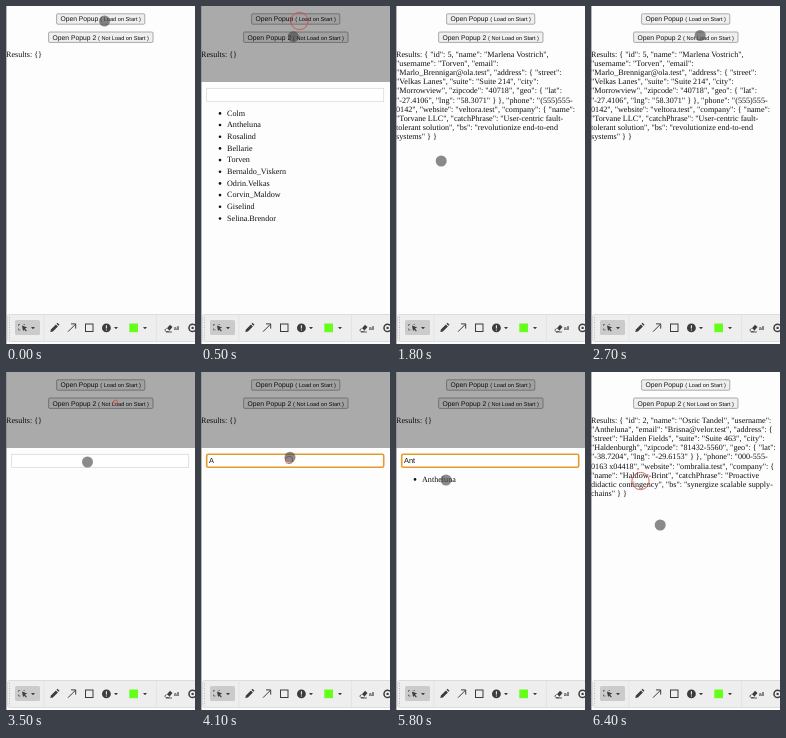
An HTML page for the animation above (6.5 s loop, 189 by 338 pixels).

```html
<!DOCTYPE html>
<html lang="en">
<head>
<meta charset="utf-8">
<title>Popup search</title>
<style>
  html, body { margin: 0; width: 100%; height: 100%; overflow: hidden; background: #fdfdfd; }
  svg { display: block; width: 189px; height: 338px; }
  text { font: 8.15px "Liberation Serif", "Times New Roman", serif; fill: #111; text-rendering: geometricPrecision; }
  .ui { font: 6.76px "Liberation Sans", Arial, sans-serif; text-anchor: middle; }
  .ui tspan { font-size: 5.63px; }
  .button { fill: #efefef; stroke: #767676; stroke-width: .6; }
  .icon { fill: none; stroke: #3c3c3c; stroke-width: 1; }
  .solid { fill: #3c3c3c; }
</style>
</head>
<body>
<svg viewBox="0 0 189 338">
  <rect width="189" height="338" fill="#fdfdfd"/>
  <rect class="button" x="50.6" y="7.8" width="88.2" height="10.4" rx="1.2"/>
  <text class="ui" x="94.7" y="15.3">Open Popup <tspan>( Load on Start )</tspan></text>
  <rect class="button" x="42.6" y="26" width="104.4" height="10.4" rx="1.2"/>
  <text class="ui" x="94.8" y="33.5">Open Popup 2 <tspan>( Not Load on Start )</tspan></text>
  <g id="results"></g>

  <g id="popup">
    <rect width="189" height="338" opacity=".33"/>
    <rect y="76" width="189" height="262" fill="#fdfdfd"/>
    <rect id="field" x="5.7" y="82.3" width="177" height="13" fill="#fff"/>
    <text id="query" class="ui" x="8" y="91.4" style="text-anchor:start;font-size:7.4px"></text>
    <g id="list"></g>
  </g>
  <rect width=".6" height="338" fill="#888"/>

  <g id="toolbar">
    <rect x="1.5" y="308.5" width="190" height="27" rx="2" fill="#eee" stroke="#d2d2d2" stroke-width=".7"/>
    <path d="M3.5 311V334" stroke="#bbb" stroke-dasharray="1 1.5"/>
    <rect x="9" y="314" width="25" height="15" rx="1.5" fill="#cbcbcb"/>
    <path d="M38 309V335M150.5 309V335" stroke="#e0e0e0" stroke-width=".7"/>
    <path class="solid" d="M16 319.5l5.2 2-2.2 1 1.8 2.2-.9.9-1.8-2.2-1 1.8z"/>
    <path class="icon" style="stroke-width:.6" d="M14 318.500h-1.500v1.500M17.500 318.500h1.500M12.500 322.500v1.500h2"/>
    <path class="solid" d="M25 321h4l-2 2.200zM108 321h4l-2 2.200zM137 321h4l-2 2.200z"/>
    <path class="solid" d="M44.300 325.900l.6-2.500 5-5 2 2-5 5zM50.500 317.700l1-1 2 2-1 1z"/>
    <path class="icon" d="M62 325.700l7.500-7.500M65 317.900h4.700v4.700"/>
    <rect class="icon" x="79.500" y="318" width="7.500" height="7.500"/>
    <circle class="solid" cx="100.400" cy="321.900" r="4.400"/>
    <path d="M100.400 319.200v3.200M100.400 323.400v1.200" stroke="#eee" stroke-width="1.100"/>
    <rect x="123.300" y="317.500" width="8.700" height="8.700" fill="#66ff1a"/>
    <path class="solid" d="M161 322.300l3-3.500 2.500 2.200-3 3.500z"/>
    <path class="icon" style="stroke-width:.8" d="M160.500 322.300l-1.800 2 1.500 1.300h2.500l.8-1M160 326h6"/>
    <text class="ui" x="170.500" y="324" style="font-size:5.400px">all</text>
    <circle class="icon" cx="186.600" cy="321.900" r="3.600" style="stroke-width:1.500"/>
    <circle class="solid" cx="186.600" cy="321.900" r="1.200"/>
  </g>

  <circle id="ring" fill="none" stroke="#d8453c" stroke-width=".8"/>
  <circle id="cursor" r="5.5" fill="#444" opacity=".62"/>
</svg>

<script>
const LOOP = 6500, STEP = 100;
const $ = id => document.getElementById(id);

const emptyResult = ['Results: {}'];
const firstResult = [
  'Results: { "id": 5, "name": "Marlena Vostrich",',
  '"username": "Torven", "email":',
  '"Marlo_Brennigar@ola.test", "address": { "street":',
  '"Velkas Lanes", "suite": "Suite 214", "city":',
  '"Morrowview", "zipcode": "40718", "geo": { "lat":',
  '"-27.4106", "lng": "58.3071" } }, "phone": "(555)555-',
  '0142", "website": "veltora.test", "company": { "name":',
  '"Torvane LLC", "catchPhrase": "User-centric fault-',
  'tolerant solution", "bs": "revolutionize end-to-end',
  'systems" } }'];
const secondResult = [
  'Results: { "id": 2, "name": "Osric Tandel", "username":',
  '"Antheluna", "email": "Brisna@velor.test", "address": {',
  '"street": "Halden Fields", "suite": "Suite 463", "city":',
  '"Haldenburgh", "zipcode": "81432-5560", "geo": { "lat":',
  '"-38.7204", "lng": "-29.6153" } }, "phone": "000-555-',
  '0163 x04418", "website": "ombralia.test", "company": {',
  '"name": "Haldow-Brint", "catchPhrase": "Proactive',
  'didactic contingency", "bs": "synergize scalable supply-',
  'chains" } }'];
const users = ['Colm', 'Antheluna', 'Rosalind', 'Bellarie', 'Torven',
  'Bernaldo_Viskern', 'Odrin.Velkas', 'Corvin_Maldow', 'Giselind', 'Selina.Brendor'];
const narrowed = users.filter((_, i) => i !== 6 && i !== 7);

// Each entry holds from its start time until the next one.
const resultSteps = [[0, emptyResult], [1600, firstResult], [3000, emptyResult], [6000, secondResult]];
const popupSteps = [[0, false], [100, true], [1600, false], [3000, true], [6000, false]];
const listSteps = [[0, users], [3000, []], [4200, users], [4900, narrowed], [5200, [users[1]]]];
const querySteps = [[0, ''], [4100, 'A'], [4300, 'An'], [4500, 'Ant']];
const focusSteps = [[0, false], [3800, true]];

// time, x, y
const path = [[0, 98.5, 15], [400, 98.5, 15], [700, 80, 62], [1000, 51, 118], [1200, 50, 136],
  [1400, 46, 154], [1600, 45.2, 155], [2200, 45.2, 155], [2300, 62, 118], [2500, 113.5, 23],
  [2700, 109.2, 29.5], [3100, 109.2, 29.5], [3500, 81.5, 90], [3700, 87, 88], [4300, 90, 84],
  [5200, 90, 84], [5500, 74, 95], [5800, 50, 108], [6000, 49, 109], [6200, 51, 117],
  [6400, 69.2, 153], [6500, 69.2, 153]];
const clicks = [[300, 98.5, 15], [1300, 46.5, 153.5], [3050, 109.5, 30], [3700, 88, 88], [6200, 49.5, 109]];

const at = (steps, t) => steps.findLast(([start]) => start <= t)[1];

function cursorAt(t) {
  const next = path.findIndex(([time]) => time > t);
  const [t0, x0, y0] = path[next - 1], [t1, x1, y1] = path[next];
  const p = (t - t0) / (t1 - t0);
  return [x0 + (x1 - x0) * p, y0 + (y1 - y0) * p];
}

function place(circle, x, y) {
  circle.setAttribute('cx', x);
  circle.setAttribute('cy', y);
}

const textLine = (x, y, line) => `<text x="${x}" y="${y}">${line}</text>`;
const resultLine = (line, i) => textLine(0, 51 + i * 9.12, line);
function listItem(name, i) {
  const y = 109.7 + i * 11.67;
  return `<circle cx="19" cy="${y - 2.3}" r="1.3" fill="#111"/>` + textLine(26, y, name);
}

function draw(t) {
  $('results').innerHTML = at(resultSteps, t).map(resultLine).join('');
  $('list').innerHTML = at(listSteps, t).map(listItem).join('');
  $('query').textContent = at(querySteps, t);
  $('popup').style.display = at(popupSteps, t) ? '' : 'none';

  const focused = at(focusSteps, t), field = $('field');
  field.setAttribute('stroke', focused ? '#e59a2c' : '#d6d6d6');
  field.setAttribute('stroke-width', focused ? 1.6 : .7);
  field.setAttribute('rx', focused ? 1.5 : 0);

  place($('cursor'), ...cursorAt(t));
  const click = clicks.find(([start]) => t >= start && t < start + 500);
  $('ring').style.display = click ? '' : 'none';
  if (click) {
    const p = (t - click[0]) / 500;
    place($('ring'), click[1], click[2]);
    $('ring').setAttribute('r', 10.3 * (1 - p * p));
  }
}

const origin = performance.now();
let shown = -1;
function tick() {
  const t = Math.floor((performance.now() - origin) % LOOP / STEP) * STEP;
  if (t !== shown) draw(shown = t);
  requestAnimationFrame(tick);
}
tick();
</script>
</body>
</html>
```
